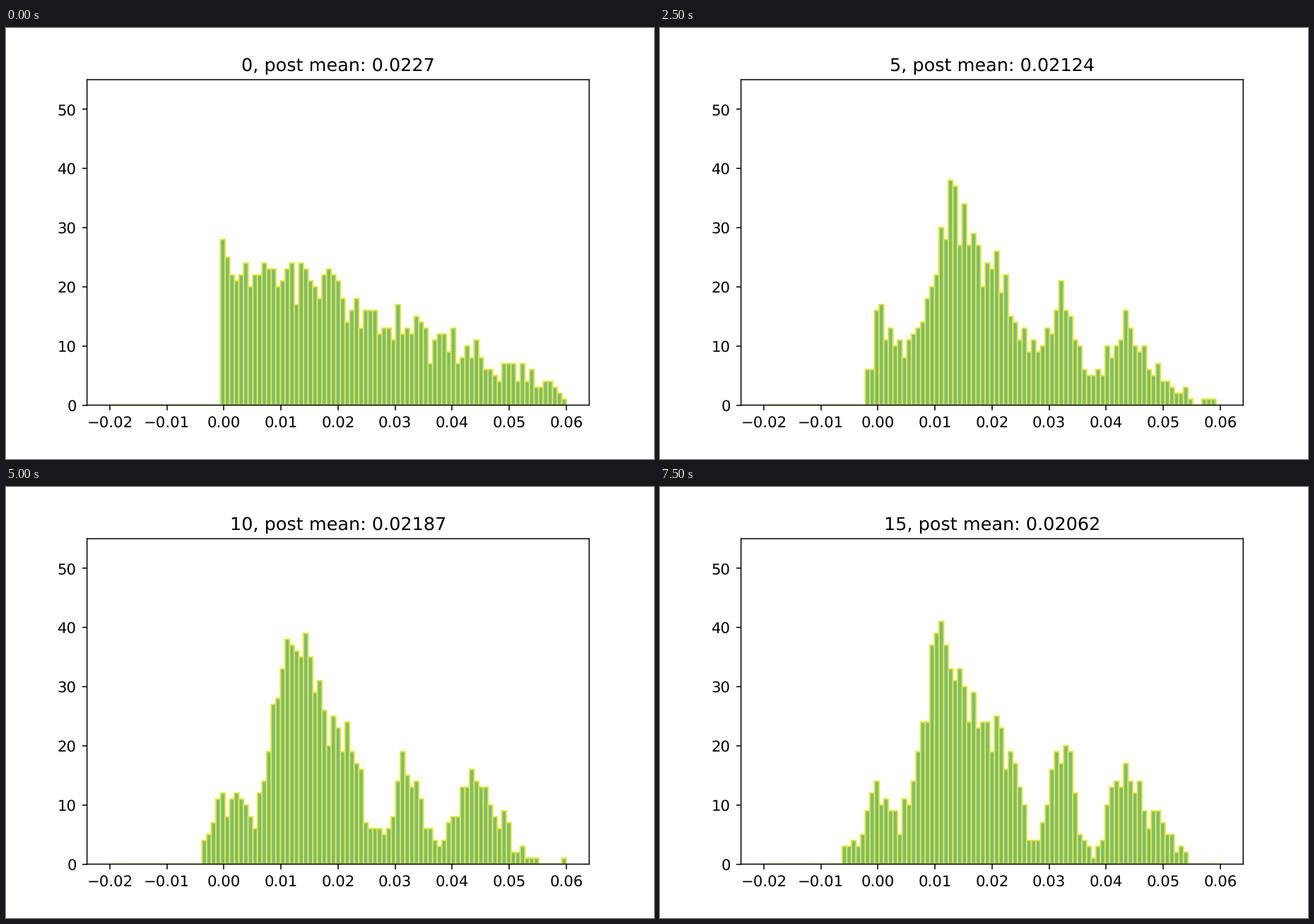
Animation of 917x611 px, one loop 8000 ms. Source, as a matplotlib script:

```python
import numpy as np
import matplotlib.pyplot as plt
from matplotlib.animation import FuncAnimation

W, H, DPI = 917, 611, 917 / 6
STEPS, STEP_MS = 16, 500
EDGES = np.linspace(-0.02, 0.06, 100)
X = (EDGES[:-1] + EDGES[1:]) / 2

# Posterior modes: centre, height, width.
MODES = [(0.0000, 11, 0.0030), (0.0215, 20, 0.0030), (0.0323, 19, 0.0022),
         (0.0430, 15, 0.0025), (0.0480, 6, 0.0028)]
# Mean shown in the title, as (step, value) key points.
MEANS = [(0, 0.0227), (2, 0.02269), (5, 0.02124), (9, 0.02299),
         (11, 0.02076), (13, 0.01979), (15, 0.02062)]


def bump(centre, height, width):
    return height * np.exp(-((X - centre) / width) ** 2 / 2)


def counts(step):
    """A falling ramp eases into a sum of modes; the left edge creeps out."""
    ramp = np.where(X > -0.0005, 25 * (1 - X.clip(0) / 0.065), 0)
    main = bump(0.0142 - 0.00015 * step, 40, 0.0038)
    modes = main + sum(bump(*mode) for mode in MODES)
    fade = np.exp(-step / 4)
    level = fade * ramp + (1 - fade) * modes
    noise = np.random.default_rng(step).normal(0, 0.6, X.size)
    n = np.round(level + noise * np.sqrt(level)).clip(0)
    n[:round(24 - 0.45 * step)] = 0
    return n


plt.rcParams.update({"font.family": "DejaVu Sans", "font.size": 10,
                     "text.hinting": "none", "axes.linewidth": 0.72,
                     "xtick.major.width": 0.72, "ytick.major.width": 0.72})
# The small margin guards against truncation of the pixel size.
fig = plt.figure(figsize=((W + 0.01) / DPI, (H + 0.01) / DPI), dpi=DPI,
                 facecolor="white")
ax = fig.add_axes([0.125, 0.125, 0.775, 0.755])
ax.set_xlim(-0.024, 0.064)
ax.set_ylim(0, 55)
bars = ax.bar(EDGES[:-1], counts(0), np.diff(EDGES), align="edge", snap=False,
              facecolor="#7bbb7c", edgecolor="#e3e72d", linewidth=0.96)
for spine in ax.spines.values():
    spine.set_snap(False)
title = ax.set_title("", fontsize=12)


def update(step):
    for bar, n in zip(bars, counts(step)):
        bar.set_height(n)
    mean = float(np.interp(step, *zip(*MEANS)))
    title.set_text(f"{step}, post mean: {round(mean, 5)}")
    return [*bars, title]


anim = FuncAnimation(fig, update, frames=STEPS, interval=STEP_MS,
                     repeat=True, repeat_delay=0, blit=False)
plt.show()
```
